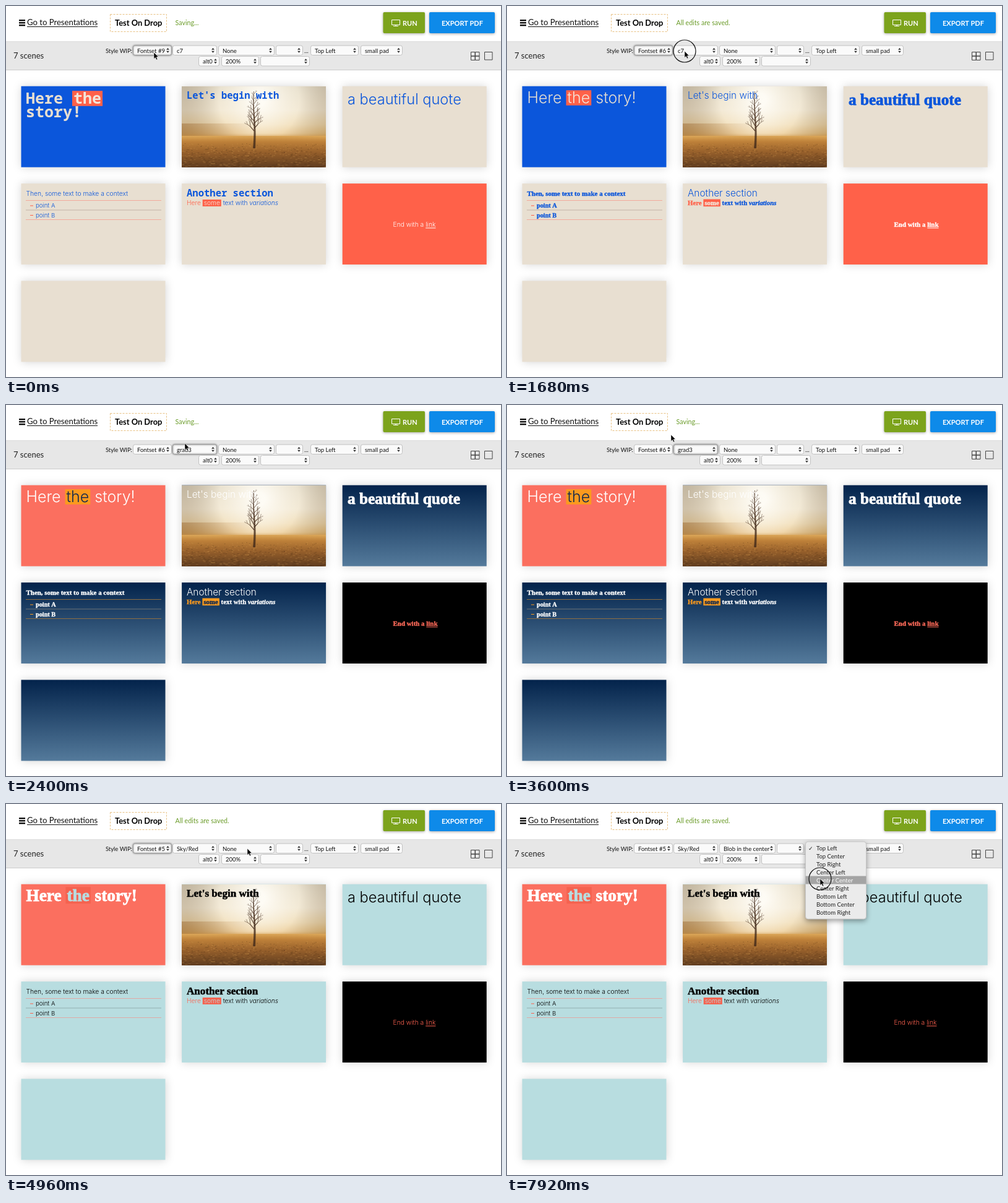
An HTML page with a canvas for the animation above (8000 ms loop, 800 px wide and 600 px high).

```html
<!DOCTYPE html>
<html lang="en">
<head>
<meta charset="utf-8">
<title>Slide styles</title>
<style>
  html, body { margin: 0; width: 100%; height: 100%; overflow: hidden; background: #fff; }
  canvas { display: block; }
</style>
</head>
<body>
<canvas id="stage" width="800" height="600"></canvas>
<script>
const ctx = document.getElementById('stage').getContext('2d');
const LOOP = 8000, STEP = 80, ROW = 13;
const SLIDE_W = 233, SLIDE_H = 131;

const lato = (size, weight = 400) => `${weight} ${size}px Lato, sans-serif`;

const FACES = {
  mono: { h1: 25, h2: 15.55, css: s => `bold ${s}px "Noto Sans Mono", "DejaVu Sans Mono", monospace` },
  sans: { h1: 25, h2: 15.4, quote: 23.6, body: 10.2, css: (s, i) => `${i} 300 ${s}px Inter, sans-serif` },
  serif: { h1: 27.3, h2: 17.1, quote: 25.2, body: 10.85, bold: true,
    css: (s, i) => `${i} bold ${s}px "Liberation Serif", serif` }
};
const FONTSETS = { 9: ['mono', 'sans'], 6: ['sans', 'serif'], 5: ['serif', 'sans'] };

const THEMES = {
  'c7': { first: '#0b56db', title: '#e8dfd1', mark: '#ff6149', markText: '#f3e6da', bg: ['#e8dfd1', '#e8dfd1'],
    text: '#0b56db', accent: '#ff6149', rule: '#f2aa9b', mid: '#c4b3a8', last: '#ff6149', link: '#fff' },
  'grad3': { first: '#fb6f5f', title: '#fff', mark: '#fb9a1e', markText: '#10294f', bg: ['#03234b', '#547a9b'],
    text: '#fff', accent: '#fb9a1e', rule: '#8d6d42', mid: '#6d7377', last: '#000', link: '#ff6b5a' },
  'Sky/Red': { first: '#fb6f5f', title: '#fff', mark: '#f5624f', markText: '#b8dde0', bg: ['#b8dde0', '#b8dde0'],
    text: '#000', accent: '#fb6250', rule: '#dfaaa6', mid: '#93afb2', last: '#000', link: '#ff6250' }
};

// Timelines: [start, value]
const FONT = [[0, 9], [640, 6], [4480, 5]];
const THEME = [[0, 'c7'], [2320, 'grad3'], [3680, 'Sky/Red']];
const SHAPE = [[0, 'None'], [6240, 'Blob in the center']];
const STATUS = [[0, 'Saving...'], [1120, 'All edits are saved.'], [2320, 'Saving...'],
  [4880, 'All edits are saved.'], [6240, 'Saving...'], [7600, 'All edits are saved.']];
const FOCUS = [[0, 0], [1760, 1], [4080, 0], [5280, 2], [7600, 4]];
const MENU = [[0, ''], [160, 'font'], [640, ''], [1760, 'theme'], [2320, ''], [3040, 'theme'], [3600, ''],
  [4080, 'font'], [4480, ''], [5440, 'shape'], [6240, ''], [7600, 'place']];
const CLICKS = [80, 560, 1600, 2160, 2880, 3440, 3920, 4320, 5280, 6160, 7360, 7920];
const POINTER = [[80, 239, 75], [560, 236, 34], [640, 236, 33], [1200, 262, 66], [1280, 262, 66],
  [1680, 287, 73], [1920, 289, 92], [2240, 289, 62], [2400, 289, 62], [2640, 296, 82], [2960, 290, 72],
  [3440, 266, 48], [3600, 265, 48], [3920, 237, 72], [4000, 237, 72], [4400, 238, 59], [4880, 383, 73],
  [4960, 390, 72], [5040, 390, 72], [5280, 386, 73], [5360, 386, 73], [5760, 390, 85], [6160, 390, 85],
  [6480, 458, 67], [6800, 480, 69], [7040, 480, 69], [7360, 507, 72], [7520, 507, 72], [7920, 506, 121]];

const numbered = (name, n) => Array.from({ length: n }, (_, i) => name + (i + 1));
const MENUS = {
  font: { x: 205, w: 63, items: numbered('Fontset #', 12) },
  theme: { x: 269.5, w: 71, items: ['Sand/Red', 'Sand/Ink', 'Sky/Ink', 'Sky/Red', 'grad2', 'grad3',
    ...numbered('c', 24).slice(6)] },
  shape: { x: 343.5, w: 90, items: ['None', ...['Blob', 'Circle', 'Wave', 'Stripe'].flatMap(s =>
    ['in the center', 'on the left', 'on the right', 'at the top'].map(p => `${s} ${p}`)), 'Grid'] },
  place: { x: 492, w: 78, items: ['Top', 'Center', 'Bottom'].flatMap(v =>
    ['Left', 'Center', 'Right'].map(h => `${v} ${h}`)) }
};

const at = (line, t) => line.filter(k => k[0] <= t).pop()[1];

function pointerAt(t) {
  const next = POINTER.findIndex(k => k[0] > t);
  if (next === 0) return POINTER[0].slice(1);
  if (next < 0) return POINTER[POINTER.length - 1].slice(1);
  const [a, b] = [POINTER[next - 1], POINTER[next]];
  const u = (t - a[0]) / (b[0] - a[0]), e = u * u * (3 - 2 * u);
  return [a[1] + (b[1] - a[1]) * e, a[2] + (b[2] - a[2]) * e];
}

function rect(x, y, w, h, fill, c = ctx) {
  c.fillStyle = fill;
  c.fillRect(x, y, w, h);
}
function box(x, y, w, h, r, fill, stroke) {
  ctx.beginPath();
  ctx.roundRect(x, y, w, h, r);
  if (fill) { ctx.fillStyle = fill; ctx.fill(); }
  if (stroke) { ctx.strokeStyle = stroke; ctx.stroke(); }
}
function shadowed(color, blur, dy, draw) {
  ctx.save();
  Object.assign(ctx, { shadowColor: color, shadowBlur: blur, shadowOffsetY: dy });
  draw();
  ctx.restore();
}
function label(text, x, y, font, color) {
  ctx.font = font;
  ctx.fillStyle = color;
  ctx.fillText(text, x, y);
}
function polygon(points, fill) {
  ctx.beginPath();
  points.forEach(([x, y]) => ctx.lineTo(x, y));
  ctx.closePath();
  ctx.fillStyle = fill;
  ctx.fill();
}

// Runs flow one after another: [text, color, { mark, italic, underline }]
function rich(x, y, face, size, runs) {
  for (const [text, color, o = {}] of runs) {
    ctx.font = face.css(size, o.italic ? 'italic' : 'normal');
    const w = ctx.measureText(text).width, pad = o.mark ? 2 : 0;
    if (o.mark) rect(x, y - size * 0.83, w + 2 * pad, size * (size > 20 ? 0.98 : 1.08), o.mark);
    ctx.fillStyle = ctx.strokeStyle = color;
    ctx.fillText(text, x + pad, y);
    if (face.bold) {
      ctx.lineWidth = size / 32;
      ctx.strokeText(text, x + pad, y);
      ctx.lineWidth = 1;
    }
    if (o.underline) rect(x, y + 1.5, w, 1, color);
    x += w + 2 * pad;
  }
}

function makePhoto() {
  const canvas = document.createElement('canvas');
  canvas.width = SLIDE_W;
  canvas.height = SLIDE_H;
  const c = canvas.getContext('2d');
  let seed = 11;
  const random = () => (seed = seed * 16807 % 2147483647) / 2147483647;
  const fill = (g, stops, y, h) => {
    stops.forEach(([p, color]) => g.addColorStop(p, color));
    rect(0, y, SLIDE_W, h, g, c);
  };
  fill(c.createLinearGradient(0, 0, 0, 95),
    [[0, '#d9d2c0'], [0.4, '#ece2cd'], [0.65, '#ecd3a4'], [0.85, '#e2b163'], [1, '#cf9344']], 0, SLIDE_H);
  fill(c.createRadialGradient(125, 22, 10, 125, 22, 120),
    [[0, 'rgba(255,253,247,.95)'], [0.5, 'rgba(250,242,224,.5)'], [1, 'rgba(140,118,88,.3)']], 0, 80);
  fill(c.createLinearGradient(0, 0, 120, 0),
    [[0, 'rgba(150,98,44,.45)'], [1, 'rgba(190,130,60,0)']], 60, 20);
  fill(c.createLinearGradient(0, 76, 0, SLIDE_H),
    [[0, 'rgba(205,145,66,0)'], [0.25, '#bd8039'], [0.55, '#97602b'], [1, '#5f3c1f']], 76, 55);
  for (let i = 0; i < 500; i++) {
    const y = 92 + 39 * random();
    rect(SLIDE_W * random(), y, 1 + (y - 85) / 14, 1,
      random() < 0.5 ? 'rgba(55,32,14,.25)' : 'rgba(226,170,92,.25)', c);
  }

  // One upright trunk with side limbs that fork into twigs
  c.strokeStyle = 'rgba(66,42,26,.8)';
  const limb = (x, y, angle, length, width) => {
    const x2 = x + Math.sin(angle) * length, y2 = y - Math.cos(angle) * length;
    c.lineWidth = width;
    c.beginPath();
    c.moveTo(x, y);
    c.lineTo(x2, y2);
    c.stroke();
    if (length < 3) return;
    for (const side of [-1, 1])
      limb(x2, y2, angle * 0.75 + side * (0.15 + 0.35 * random()), length * (0.55 + 0.15 * random()), width * 0.65);
  };
  for (let y = 100; y > 10; y -= 4) {
    const k = (y - 6) / 94;
    c.lineWidth = 0.6 + 3.2 * k;
    c.beginPath();
    c.moveTo(117 - Math.sin(y / 16), y);
    c.lineTo(117 - Math.sin((y - 4) / 16), y - 4);
    c.stroke();
    if (y < 76) limb(117, y, (y % 8 ? 1 : -1) * (0.5 + 0.4 * random()), 3.5 + 8 * k, 0.5 + 1.2 * k);
  }
  return canvas;
}
const photo = makePhoto();

function drawHeader(status) {
  for (const y of [22, 26, 30]) rect(21, y, 10, 2.4, '#111');
  label('Go to Presentations', 34, 31, lato(13.1), '#111');
  rect(34, 33, 114, 1, '#111');
  ctx.setLineDash([3, 2]);
  box(168.5, 13.5, 91, 28, 0, null, '#e8c183');
  ctx.setLineDash([]);
  label('Test On Drop', 176, 32, lato(12.9, 700), '#000');
  label(status, 273.5, 31, lato(10.7), '#6b9c2a');
  shadowed('rgba(0,0,0,.35)', 4, 1, () => {
    box(609.5, 10, 67.5, 34, 2, '#7ca31c');
    box(684, 10, 106, 34, 2, '#0e8ae9');
  });
  box(623.5, 22.5, 13, 8, 0, null, '#fff');
  rect(629.5, 30, 1, 3, '#fff');
  rect(626, 32, 8, 1, '#fff');
  label('RUN', 641, 32, lato(11, 700), '#fff');
  label('EXPORT PDF', 704, 32, lato(11, 700), '#fff');

  rect(0, 57, 800, 47, '#e7e7e7');
  rect(0, 57, 800, 1, '#dcdcdc');
  rect(0, 103, 800, 1, '#cdcdcd');
  label('7 scenes', 12, 85, lato(13), '#222');
  for (const x of [751.5, 758.5]) for (const y of [74.5, 81]) box(x, y, 6.5, 6.5, 0, null, '#444');
  box(773.5, 74.5, 12.5, 12.5, 0, null, '#444');
}

function drawSelects(values, focus) {
  label('Style WIP:', 161, 76, lato(9.4), '#111');
  label('...', 482, 76, lato(9.4), '#111');
  const spots = [[205.5, 62], [269.5, 71], [343.5, 90], [436.5, 43], [492.5, 77], [573.5, 67],
    [311.5, 33], [348.5, 60], [411.5, 79]];
  spots.forEach(([x, w], i) => {
    const y = i < 6 ? 64 : 81.5;
    const draw = () => box(x, y, w, 15.5, 3, '#fafafa', i === focus ? '#999' : '#c2c2c2');
    if (i === focus) shadowed('rgba(0,0,0,.45)', 3, 0, draw); else draw();
    label(values[i], x + 6.5, y + 11.5, lato(9.5), '#111');
    const ax = x + w - 6, ay = y + 7.7;
    polygon([[ax - 2.4, ay - 1], [ax + 2.4, ay - 1], [ax, ay - 4]], '#333');
    polygon([[ax - 2.4, ay + 1], [ax + 2.4, ay + 1], [ax, ay + 4]], '#333');
  });
}

function drawSlides(theme, set) {
  const [head, body] = FONTSETS[set].map(name => FACES[name]);
  const { text, accent, mark, markText } = theme;
  for (let i = 0; i < 7; i++) {
    const x = 24.5 + 259.6 * (i % 3), y = 129.7 + 157.4 * Math.floor(i / 3);
    let fill = theme.bg[0];
    if (i === 0) fill = theme.first;
    else if (i === 5) fill = theme.last;
    else if (theme.bg[0] !== theme.bg[1]) {
      fill = ctx.createLinearGradient(0, y, 0, y + SLIDE_H);
      theme.bg.forEach((color, k) => fill.addColorStop(k, color));
    }
    shadowed('rgba(0,0,0,.17)', 14, 0, () => rect(x, y, SLIDE_W, SLIDE_H, fill));
  }
  ctx.drawImage(photo, 284, 130);

  const marked = { mark };
  const title = [['Here ', theme.title], ['the', markText, marked]];
  if (set === 9) {
    rich(32, 158, head, head.h1, title);
    rich(32, 180, head, head.h1, [['story!', theme.title]]);
  } else {
    rich(32.5, 157, head, head.h1, [...title, [' story!', theme.title]]);
  }
  rich(292, 150, head, head.h2, [["Let's begin with", text]]);
  rich(552, body.bold ? 160 : 159, body, body.quote, [['a beautiful quote', text]]);

  rich(32.5, 306.5, body, body.body + 0.1, [['Then, some text to make a context', text]]);
  ['point A', 'point B'].forEach((item, i) => {
    rect(39, 322.5 + 15.5 * i, 5, 1, accent);
    rich(48, 326 + 15.5 * i, body, body.body - 0.6, [[item, text]]);
  });
  [314, 329.5, 345].forEach((y, i) => rect(32, y, 219, 1, i === 1 ? theme.mid : theme.rule));

  rich(292, 308, head, head.h2, [['Another section', text]]);
  rich(292, 321.5, body, body.body, [['Here ', accent], ['some', markText, marked],
    [' text with ', text], ['variations', text, { italic: true }]]);
  rich(625.5, 357, body, body.body + 0.1, [['End with a ', theme.link], ['link', theme.link, { underline: true }]]);
}

function drawMenu({ x, w, items }, value, py) {
  const current = items.indexOf(value), top = 71 - current * ROW;
  const y = Math.max(-10, top - 10), bottom = top + (items.length - 1) * ROW + 11;
  shadowed('rgba(0,0,0,.4)', 8, 3, () => box(x - 9.5, y, w + 20, bottom - y, 4, '#ebebeb'));
  box(x - 9.5, y, w + 20, bottom - y, 4, null, '#c6c6c6');
  items.forEach((item, i) => {
    const middle = top + i * ROW, over = Math.abs(py + 1 - middle) < ROW / 2;
    if (over) rect(x - 9.5, middle - 6.5, w + 20, ROW, '#a4a4a4');
    const color = over ? '#fff' : '#222';
    label(item, x + 8, middle + 3.5, lato(9.5), color);
    if (i === current) label('✓', x - 5, middle + 3.5, '9px "DejaVu Sans", sans-serif', color);
  });
}

function drawPointer(x, y, pressed) {
  if (pressed) {
    ctx.beginPath();
    ctx.arc(x, y, 18, 0, 7);
    ctx.strokeStyle = '#111';
    ctx.lineWidth = 1.2;
    ctx.stroke();
    ctx.lineWidth = 1;
  }
  const arrow = [[0, 0], [0, 10.5], [2.4, 8.3], [4, 12], [5.8, 11.2], [4.2, 7.6], [7.3, 7.4]];
  polygon(arrow.map(([dx, dy]) => [x + dx, y + dy]), '#000');
  ctx.strokeStyle = 'rgba(255,255,255,.85)';
  ctx.lineWidth = 0.6;
  ctx.stroke();
  ctx.lineWidth = 1;
}

function draw(t) {
  rect(0, 0, 800, 600, '#fff');
  const font = at(FONT, t), theme = at(THEME, t), shape = at(SHAPE, t), menu = at(MENU, t);
  const values = { font: 'Fontset #' + font, theme, shape, place: 'Top Left' };
  const [px, py] = pointerAt(t);
  drawHeader(at(STATUS, t));
  drawSelects([values.font, theme, shape, '', values.place, 'small pad', 'alt0', '200%', ''], at(FOCUS, t));
  drawSlides(THEMES[theme], font);
  if (menu) drawMenu(MENUS[menu], values[menu], py);
  drawPointer(px, py, CLICKS.some(c => t >= c && t < c + 160));
}

const start = performance.now();
function tick() {
  const t = (performance.now() - start) % LOOP;
  draw(Math.floor(t / STEP) * STEP);
  requestAnimationFrame(tick);
}
tick();
</script>
</body>
</html>
```
